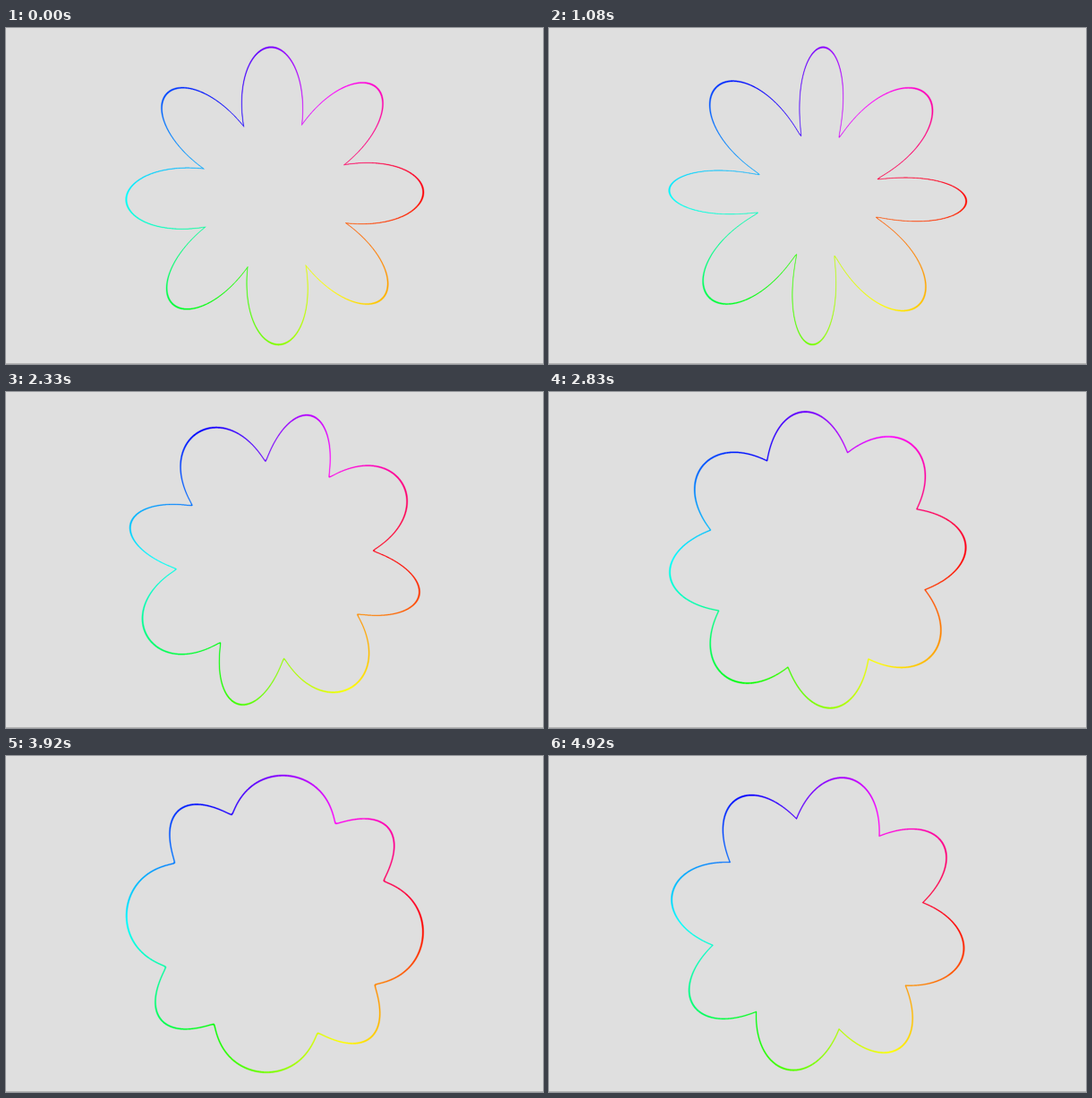
These frames come from a looping animation (600 px wide and 375 px high, 5.01 s). An HTML page with a canvas:

```html
<!DOCTYPE html>
<html lang="en">
<head>
<meta charset="utf-8">
<title>Rainbow flower</title>
<style>
  html, body { margin: 0; width: 100%; height: 100%; overflow: hidden; background: #dfdfdf; }
  canvas { display: block; width: 600px; height: 375px; }
</style>
</head>
<body>
<canvas id="stage" width="600" height="375"></canvas>
<script>
const ctx = document.getElementById('stage').getContext('2d');
const CX = 300.3, CY = 187.4, RADIUS = 166;
const LOOP = 5010, STEP = 250 / 3, STEPS = 60, SAMPLES = 2880;
const TAU = Math.PI * 2, RAD = Math.PI / 180;

// step, petal angle (deg), petal depth (px), narrowing of every other petal (deg)
const KEYS = [
  [0, -1.6, 81, 0],
  [13, 47.2, 96, -9.4],
  [19, 68, 56, 7.4],
  [28, 104, 55, 6.3],
  [41, 159.1, 28, -11],
  [53, 210.8, 45.5, -1.5],
  [59, 236.8, 46, 1.5]
];

const hues = ctx.createConicGradient(0, CX, CY);
['#f00', '#ff0', '#0f0', '#0ff', '#00f', '#f0f', '#f00']
  .forEach((c, i) => hues.addColorStop(i / 6, c));

function slope(i, col) {
  const a = KEYS[Math.max(i - 1, 0)], b = KEYS[Math.min(i + 1, KEYS.length - 1)];
  return (b[col] - a[col]) / (b[0] - a[0]);
}

// Smooth curve through one column of the keys
function track(n, col) {
  let i = 0;
  while (i < KEYS.length - 2 && n >= KEYS[i + 1][0]) i++;
  const a = KEYS[i], b = KEYS[i + 1], d = b[0] - a[0];
  const t = (n - a[0]) / d, q = 1 - t;
  return q * q * (1 + 2 * t) * a[col] + t * t * (3 - 2 * t) * b[col]
    + d * t * q * (q * slope(i, col) - t * slope(i + 1, col));
}

// Returns the radius as a function of the angle
function flower(n) {
  const tip = track(n, 1) * RAD, depth = track(n, 2), skew = track(n, 3);
  const edge = 2 * (45 - skew) * RAD;
  const cut = Math.cos(edge);
  const bend = (Math.PI / 2 - edge) / Math.sin(edge);
  const full = Math.min(1, (110 - depth) / 60);
  const soft = 0.005 * Math.abs(skew);
  const top = Math.hypot(1, soft) - soft;
  return angle => {
    const p = 4 * (angle - tip), u = Math.cos(p) - cut;
    const plain = u > 0 ? u / (1 - cut) : -u / (1 + cut);
    const bent = Math.abs(Math.cos(p + bend * Math.sin(p)));
    const v = plain + (bent - plain) * full;
    return RADIUS - depth + depth * (Math.hypot(v, soft) - soft) / top;
  };
}

function addOutline(radius, offset) {
  for (let i = 0; i < SAMPLES; i++) {
    const a = i / SAMPLES * TAU, r = radius(a) + offset;
    const x = CX + r * Math.cos(a), y = CY + r * Math.sin(a);
    if (i) ctx.lineTo(x, y); else ctx.moveTo(x, y);
  }
  ctx.closePath();
}

function draw(n) {
  ctx.fillStyle = '#dfdfdf';
  ctx.fillRect(0, 0, 600, 375);
  ctx.fillStyle = '#b4b4b4';
  ctx.fillRect(0, 374, 600, 1);

  // The band is equally thick along the radius, so steep sides look thinner
  const radius = flower(n);
  ctx.beginPath();
  addOutline(radius, 0.8);
  addOutline(radius, -0.8);
  ctx.fillStyle = ctx.strokeStyle = hues;
  ctx.lineWidth = 0.4;
  ctx.fill('evenodd');
  ctx.stroke();
}

const start = performance.now();
let shown = -1;
function tick() {
  const t = (performance.now() - start) % LOOP;
  const n = Math.min(STEPS - 1, Math.floor((t + 4) / STEP));
  if (n !== shown) draw(shown = n);
  requestAnimationFrame(tick);
}
tick();
</script>
</body>
</html>
```
